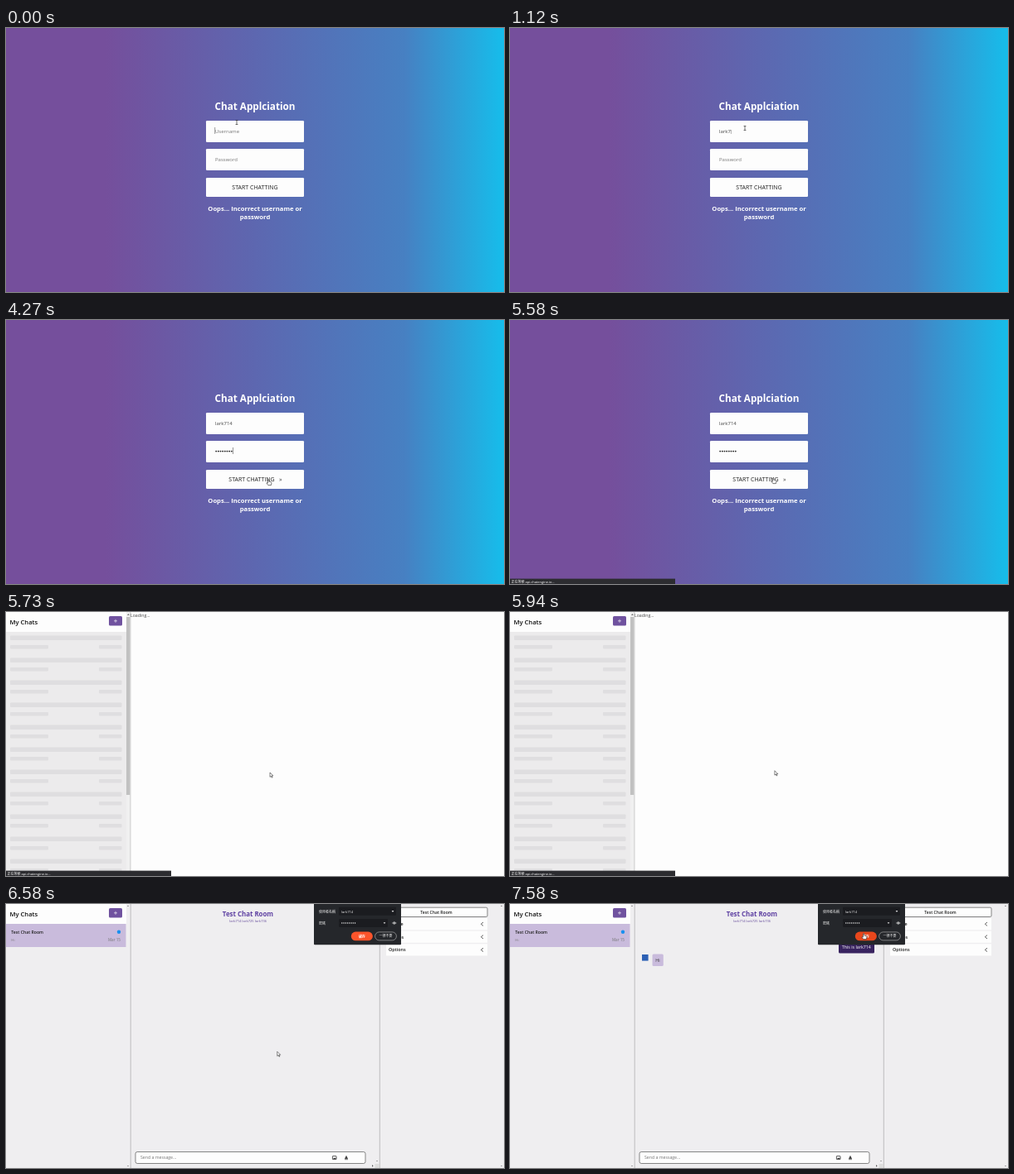
An HTML page that plays this animation: 600 px wide and 319 px high, repeating every 7610 ms.

```html
<!DOCTYPE html>
<html lang="en">
<head>
<meta charset="utf-8">
<title>Chat login</title>
<style>
  html, body { margin: 0; width: 100%; height: 100%; overflow: hidden; background: #fdfdfd; }
  svg { display: block; width: 600px; height: 319px;
        font-family: "Open Sans", "Noto Sans", "Noto Sans CJK TC", "Noto Sans CJK SC", "Noto Sans CJK", sans-serif; }
  text { white-space: pre; }
</style>
</head>
<body>
<svg id="stage" viewBox="0 0 600 319"></svg>
<script>
const LOOP = 7610;
const USER = 'lark714';
const USER_KEYS = [850, 910, 970, 1030, 1090, 1300, 1450];
const PASS_KEYS = [1970, 2090, 2180, 2270, 2520, 2640, 2840, 2940];
const FOCUS_PASS = 1850, HOVER = 3900, STATUS = 4400, LOADING = 5730,
      DIALOG = 6000, ROOM = 6300, MESSAGES = 6600, AVATAR = 7390;

// Pointer stops: time, x, y
const PATH = [
  [30, 278, 114], [790, 283, 121], [3450, 283, 121], [4180, 317, 196], [5520, 317, 196],
  [5580, 318, 194], [5800, 318, 194], [6100, 320, 189], [6450, 322, 185], [6520, 322, 185],
  [6700, 340, 160], [6970, 340, 160], [7240, 400, 80], [7390, 400, 80], [7560, 427, 39]
];

const stage = document.getElementById('stage');
const clamp = v => Math.max(0, Math.min(1, v));
const ease = v => { v = clamp(v); return v * v * (3 - 2 * v); };
const typed = (keys, t) => keys.filter(k => k <= t).length;

const rect = (x, y, w, h, fill, r = 0, extra = '') =>
  `<rect x="${x}" y="${y}" width="${w}" height="${h}" rx="${r}" fill="${fill}" ${extra}/>`;
const text = (x, y, size, fill, str, weight = 400, anchor = 'start') =>
  `<text x="${x}" y="${y}" font-size="${size}" fill="${fill}" font-weight="${weight}" text-anchor="${anchor}">${str}</text>`;
const path = (d, fill, stroke = 'none', w = .6) =>
  `<path d="${d}" fill="${fill}" stroke="${stroke}" stroke-width="${w}"/>`;
const dots = (n, x, y, step, r, fill) =>
  Array.from({ length: n }, (_, i) => `<circle cx="${x + i * step}" cy="${y}" r="${r}" fill="${fill}"/>`).join('');
const triangle = (x, y, s, fill) => path(`M${x - s} ${y - s / 2}h${2 * s}l${-s} ${1.3 * s}z`, fill);

function login(t) {
  const inPass = t >= FOCUS_PASS;
  const names = typed(USER_KEYS, t), marks = typed(PASS_KEYS, t);
  const lastKey = Math.max(0, ...[...USER_KEYS, FOCUS_PASS, ...PASS_KEYS].filter(k => k <= t));
  const caret = (t - lastKey) % 1000 < 530;
  const bar = (x, y) => rect(x, y, .5, 8, '#333');
  const hover = ease((t - HOVER) / 300);

  let s = rect(0, 0, 600, 319, 'url(#sky)')
    + text(300, 99, 11.7, '#fff', 'Chat Applciation', 700, 'middle')
    + rect(241, 112, 118, 26, '#fdfdfd', 1.2)
    + rect(241, 146, 118, 26, '#fdfdfd', 1.2)
    + rect(241, 181, 118, 23, '#fdfdfd', 1.2);

  if (names) {
    const mark = caret && !inPass ? '<tspan dx="-1.3">|</tspan>' : '';
    s += text(252, 126.7, 6, '#444', USER.slice(0, names) + mark);
  } else {
    s += text(252, 126.7, 6, '#777', 'Username') + (caret ? bar(251.6, 120) : '');
  }
  s += marks ? dots(marks, 253.2, 158.6, 2.65, .95, '#222') : text(252, 160.7, 6, '#777', 'Password');
  if (inPass && caret) s += bar(251.8 + marks * 2.7, 154);

  s += text(300 - 4 * hover, 195.4, 7, '#222', 'START CHATTING', 400, 'middle')
    + `<g opacity="${hover}">${text(329 + 3 * (1 - hover), 195, 7, '#444', '»')}</g>`
    + text(300, 220.5, 7.65, '#fff', 'Oops... Incorrect username or', 700, 'middle')
    + text(300, 231, 7.65, '#fff', 'password', 700, 'middle');
  return s;
}

const sideHeader = () => rect(0, 0, 145, 24, '#fdfdfd')
  + text(4.5, 15, 7.6, '#111', 'My Chats', 600)
  + rect(124, 5, 16, 11.5, '#70529f', 1.6)
  + path('M130 10.8h4M132 8.8v4', 'none', '#fff', .6);

function loading() {
  let s = rect(0, 0, 600, 319, '#fdfdfd') + rect(0, 24, 145, 295, '#ecebec') + sideHeader();
  for (let y = 28.5; y < 313; y += 27) {
    s += rect(5, y, 134.5, 5.5, '#dfdee0', 1)
      + rect(5, y + 11.5, 46, 4.5, '#dfdee0', 1)
      + rect(112, y + 11.5, 27.5, 4.5, '#dfdee0', 1);
  }
  return s + rect(145, 0, 5, 319, '#f0f0f0') + rect(145, 6, 4.3, 215, '#c1c1c1')
    + rect(149.6, 0, .7, 319, '#bbb')
    + path('M146 4l1.4-2 1.4 2z', '#777') + triangle(147.4, 316, 1.4, '#777')
    + text(150, 5.6, 5.2, '#444', 'Loading...');
}

function room(t) {
  const lilac = '#c9bbdc', line = '#aaa';
  let s = rect(0, 0, 600, 319, '#efeef0') + sideHeader()
    + rect(0, 24, 144.5, 28, lilac)
    + text(6.3, 36, 5.15, '#222', 'Test Chat Room', 600)
    + `<circle cx="136" cy="33.7" r="2.2" fill="#1890f0"/>`
    + text(6.3, 44.6, 4.3, '#777', 'Hi')
    + text(138, 44.6, 4.6, '#777', 'Mar 15', 400, 'end')
    + path('M150.2 0V319M450.3 0V319', 'none', line, .7)
    + text(291.5, 14.7, 7.9, '#6043a3', 'Test Chat Room', 700, 'middle')
    + text(291.5, 22.2, 4, '#8773b0', `${USER} lark725 lark736`, 600, 'middle')
    + rect(156, 299.5, 277, 14, '#fdfdfd', 2.2, 'stroke="#555" stroke-width=".7"')
    + text(162, 308.4, 5.2, '#777', 'Send a message...')
    + rect(393.4, 304.6, 4.6, 4, 'none', .4, 'stroke="#333" stroke-width=".8"')
    + path('M394 308l1.5-1.6 1 .8 1-1v2z', '#333')
    + path('M408 308.7h4M410 304.4l1.6 3.3h-3.2z', '#333', '#333', .6)
    + rect(444.5, 314, 5.5, 5, '#ddd')
    + path('M441 315l1.6 1.4-1.6 1.4z', '#555') + triangle(447, 310.5, 1, '#777')
    + rect(457.5, 4.2, 122.5, 11.3, '#fdfdfd', 1.6, 'stroke="#555" stroke-width=".7"')
    + text(518.5, 11.8, 5.1, '#222', 'Test Chat Room', 600, 'middle');
  for (const x of [147, 597]) s += path(`M${x - 1} 3l1-1.5 1 1.5z`, '#777') + triangle(x, 316.5, 1, '#777');

  ['People', 'Photos', 'Options'].forEach((label, i) => {
    const y = 17 + i * 15.6;
    s += rect(458, y, 122, 14.3, '#fdfdfd') + text(461, y + 9.2, 5.4, '#222', label, 600)
      + path(`M575 ${y + 5}l-2.7 2.2 2.7 2.2`, 'none', '#222', .7);
  });

  if (t >= MESSAGES) {
    s += rect(171.5, 60.5, 13.3, 14.5, lilac, 1.6) + text(175.3, 69.8, 5.3, '#333', 'Hi')
      + rect(396, 45, 43, 14.5, '#38235f', 1.6) + text(399.8, 54.2, 5.3, '#fff', 'This is ' + USER);
  }
  if (t >= AVATAR) s += rect(159, 61, 7.6, 7.6, '#2d61b5');
  return s;
}

function dialog(t) {
  const pressed = t >= 7520;
  return rect(371, -2, 105, 51.3, '#25272b', 1)
    + text(377, 10.6, 4, '#eee', '使用者名稱') + text(377, 24.8, 4, '#eee', '密碼')
    + rect(401, 3.8, 69, 10, '#1b1c20', 1) + rect(401, 18, 59, 10, '#1b1c20', 1)
    + text(404, 10.6, 4.1, '#eee', USER)
    + dots(8, 404.8, 23, 2.25, .7, '#eee')
    + triangle(466, 8.8, 1.4, '#ddd') + triangle(456, 23, 1.4, '#ddd')
    + path('M465.4 23q2.4-3 4.8 0q-2.4 3-4.8 0z', 'none', '#ddd', .6)
    + `<circle cx="467.8" cy="23" r=".9" fill="#ddd"/>`
    + rect(415.8, 33.6, 26, 10.6, pressed ? '#e8471c' : '#fb542b', 5.3)
    + text(428.8, 40.5, 4.1, '#fff', '儲存', 600, 'middle')
    + rect(444.6, 33.9, 25.8, 10, 'none', 5, 'stroke="#bbb" stroke-width=".6"')
    + text(457.5, 40.4, 4, '#eee', '一律不要', 400, 'middle');
}

function status(t) {
  const shown = t < LOADING ? clamp((t - STATUS) / 150) : 1 - .4 * clamp((t - 6030) / 90);
  return `<g opacity="${shown}">${rect(0, 312.6, 199, 6.4, '#2c2c30')}${text(1.5, 317.7, 4, '#fff', '正在等候 api.chatengine.io...')}</g>`;
}

function pointer(t) {
  const i = PATH.findIndex(p => p[0] > t);
  const b = PATH[i < 0 ? PATH.length - 1 : i], a = PATH[i < 0 ? PATH.length - 1 : Math.max(0, i - 1)];
  const k = ease((t - a[0]) / (b[0] - a[0] || 1));
  const x = a[1] + (b[1] - a[1]) * k, y = a[2] + (b[2] - a[2]) * k;
  const overField = y < 138 || (y > 146 && y < 172);
  let shape;
  if (t < LOADING && y < 172 && overField) {
    shape = path('M-1.4-2.5h2.8M0-2.5v5M-1.4 2.5h2.8', 'none', '#333', .7);
  } else if ((t < LOADING && y > 181) || t >= 7520) {
    shape = path('M-1.5-3.2q.8-.8 1.3 0v2.3l2.6.7q.6.3.5 1.1l-.5 2.7h-3.6l-2-2.7q.1-.9 1.7.2z', '#fff', '#222', .6);
  } else {
    shape = path('M0 0v5.4l1.3-1.2.9 2 .9-.4-.9-1.9h1.7z', '#fff', '#222', .55);
  }
  return `<g transform="translate(${x} ${y})">${shape}</g>`;
}

const defs = `<defs><linearGradient id="sky">
  <stop offset=".2" stop-color="#754f9c"/><stop offset=".5" stop-color="#5d67b0"/>
  <stop offset=".8" stop-color="#4780c2"/><stop offset="1" stop-color="#16bdeb"/>
</linearGradient></defs>`;

function draw(now) {
  const t = now % LOOP;
  let s = t < LOADING ? login(t) : t < ROOM ? loading() : room(t);
  if (t >= STATUS && t < ROOM) s += status(t);
  if (t >= DIALOG) s += dialog(t);
  stage.innerHTML = defs + s + pointer(t);
}

const start = performance.now();
function tick() {
  draw(performance.now() - start);
  requestAnimationFrame(tick);
}
tick();
</script>
</body>
</html>
```
